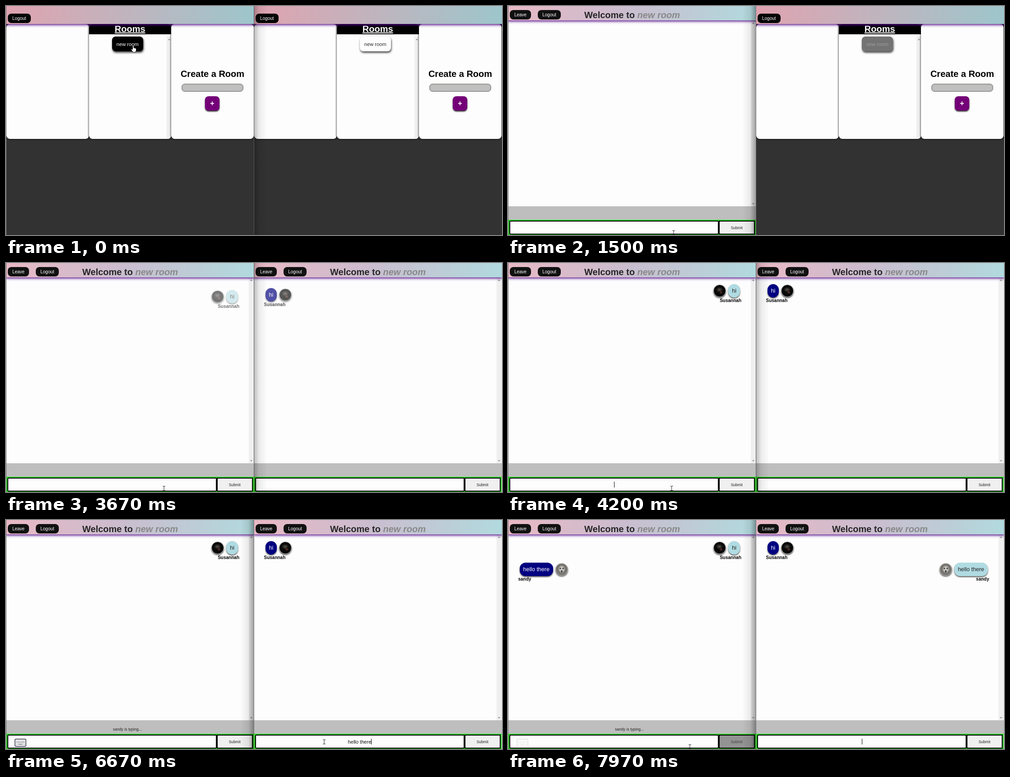
An HTML page that plays this animation: 1099 px wide and 510 px high, repeating every 8 s.

```html
<!DOCTYPE html>
<html lang="en">
<head>
<meta charset="utf-8">
<title>Chat rooms</title>
<style>
html, body { margin: 0; width: 100%; height: 100%; overflow: hidden; background: #323232; }
body { position: relative; font-family: "Liberation Sans", Arial, sans-serif; }
body * { box-sizing: border-box; }
.pane, .pane div, .shade, #cursor { position: absolute; }
.pane { top: 0; width: 550px; height: 510px; overflow: hidden; background: #323232; }
.pane::after { content: ""; position: absolute; left: 0; top: 0; width: 1px; height: 100%; background: #777; }
.page { inset: 0; isolation: isolate; }
.mid { display: flex; align-items: center; justify-content: center; white-space: pre; }
.bar { left: 0; top: 0; width: 550px; z-index: 2; box-shadow: 0 1px 6px 1px #4b0082; }
.btn { height: 21px; border-radius: 8px; background: #050505; color: #fff; font-size: 10px; }
h2 { margin: 0; font-size: 20px; line-height: 23px; }

.rooms .bar { height: 40px; background: linear-gradient(100deg, #e0a3b0, #9dc6cc); }
.card { top: 40px; width: 182.5px; height: 256px; border-radius: 8px; background: #fdfdfd; box-shadow: 0 0 4px #000; overflow: hidden; }
.title { left: 0; top: 0; width: 100%; height: 23px; background: #000; color: #fff; text-decoration: underline; }
.scroll { background: #efefef; }
.arrow { border: solid transparent; border-width: 0 2.5px 3px; border-bottom-color: #999; }
.arrow.down { transform: scaleY(-1); }
.room { left: 51px; top: 28px; width: 69.5px; height: 33px; border-radius: 8px; font-size: 11.11px; box-shadow: 1px 3px 4px #444; }
.name { left: 23px; top: 133px; width: 137px; height: 18px; border: 1.5px solid #808078; border-radius: 7px; background: #c0c0c0; box-shadow: inset 0 0 3px #888; }
.add { left: 75px; top: 161px; width: 32px; height: 32px; border-radius: 8px; background: #740078; color: #fff; font: bold 16px "Liberation Sans", Arial, sans-serif; box-shadow: 0 2px 3px #222; }

.chat { background: #bebebe; }
.chat .bar { height: 32px; background: linear-gradient(100deg, #e9b9c5, #cbbcce 45%, #b1dade); }
.chat .btn { top: 9px; background: #111; }
.chat h2 { color: #262626; }
.chat i { color: #888; }
.log { left: 1px; top: 32px; width: 549px; height: 414px; background: #fdfdfd; }
.note { left: 0; top: 460px; width: 538px; height: 12px; font-size: 8.6px; color: #222; }
.form { left: 1px; top: 476px; width: 548px; height: 34px; background: #2bdc20; }
.field { left: 1.5px; top: 2px; width: 464px; height: 31px; border: 2px solid #000; border-radius: 3px; background: #fdfdfd; font-size: 11.11px; color: #111; }
.field .caret { position: relative; width: 0; height: 13px; }
.caret::after { content: ""; position: absolute; left: 0; width: 1px; height: 13px; background: #000; }
.keys { position: absolute; left: 14.5px; top: 7px; }
.send { left: 465.5px; top: 2px; width: 80.5px; height: 31px; border: 2px solid #000; font-size: 8.4px; }

.msg { width: 200px; height: 46px; }
.msg.other { left: 24.5px; }
.msg.own { right: 36px; }
.row { inset: 0 0 auto; height: 30px; display: flex; align-items: center; gap: 5px; }
.own .row { flex-direction: row-reverse; }
.msg .row > div { position: relative; }
.bubble { padding: 0 8px; line-height: 30px; border-radius: 13px; font-size: 12.5px; white-space: pre; box-shadow: 0 2px 3px #555; }
.own .bubble { background: #b0dbe2; color: #222; }
.other .bubble { background: #000080; color: #fff; }
.face { width: 28px; height: 28px; border-radius: 50%; border: 1.5px solid #c4c4c4; box-shadow: 0 2px 3px #555; }
.dark { background: radial-gradient(ellipse 4px 3px at 62% 64%, #7c3a32, #7c3a3200), radial-gradient(ellipse 8px 6px at 48% 40%, #5a524c, #5a524c00), #080808; }
.pale {
  background: radial-gradient(ellipse 2px 3px at 50% 66%, #2c2a2a 60%, #2c2a2a00),
    radial-gradient(circle 2px at 38% 42%, #333 60%, #3330), radial-gradient(circle 2px at 62% 42%, #333 60%, #3330),
    radial-gradient(ellipse 8px 9px at 50% 48%, #cfccc8 50%, #cfccc800), #77746f;
}
.by { top: 31px; font-weight: bold; font-size: 10px; line-height: 12px; color: #050505; }
.other .by { left: -3px; }
.own .by { right: -3px; }

.shade { top: 0; width: 30px; height: 510px; }
#cursor { left: 0; top: 0; overflow: visible; }
</style>
</head>
<body>
<script>
const NAMES = ['Susannah', 'sandy'];
const WORDS = ['hi', 'hello there'];
const LOOP = 8000;

const box = (cls, x, y, w, h, html = '') =>
  `<div class="${cls}" style="left:${x}px;top:${y}px;width:${w}px;height:${h}px">${html}</div>`;

function keyboard() {
  let dots = '';
  for (let r = 0; r < 2; r++)
    for (let c = 0; c < 6; c++) dots += `M${4.2 + c * 3.2} ${5.5 + r * 3.2}h1.8`;
  return `<svg class="keys" width="26" height="18" fill="none" stroke="#5a5a68">
    <rect x="1" y="1" width="24" height="16" rx="2" stroke-width="2"/>
    <path d="${dots}M4.2 12.500h1.800M8 12.500h10M20.200 12.500h1.800" stroke-width="1.7"/></svg>`;
}

function message(i, pane) {
  return `<div class="msg ${i === pane ? 'own' : 'other'}" style="top:${46.5 - 32 + i * 48.5}px">
    <div class="row"><div class="bubble">${WORDS[i]}</div><div class="face ${i ? 'pale' : 'dark'}"></div></div>
    <div class="by">${NAMES[i]}</div></div>`;
}

function rooms() {
  return `<div class="page rooms"><div class="bar">${box('btn mid', 4, 17, 50.5, 21, 'Logout')}</div>
    <div class="card" style="left:1px"></div>
    <div class="card" style="left:183.5px">
      <h2><div class="title mid">Rooms</div></h2>
      ${box('scroll', 172.5, 28, 10, 228)}${box('arrow', 175, 33, 5, 3)}
      <div class="room mid">new room</div></div>
    <div class="card" style="left:366px">
      <h2>${box('mid', 0, 99, 183, 24, 'Create a Room')}</h2>
      <div class="name"></div><div class="add mid">+</div></div></div>`;
}

function chat(pane) {
  return `<div class="page chat"><div class="bar">
      ${box('btn mid', 4, 9, 47, 21, 'Leave')}${box('btn mid', 66, 9, 51, 21, 'Logout')}
      <h2>${box('mid', 0, 8, 550, 24, 'Welcome to <i>new room</i>')}</h2></div>
    <div class="log">${box('scroll', 537, 0, 12, 414)}
      ${box('arrow', 540, 5, 5, 3)}${box('arrow down', 540, 407, 5, 3)}
      ${message(0, pane)}${message(1, pane)}</div>
    <div class="note mid">${NAMES[1 - pane]} is typing...</div>
    <div class="form"><div class="field mid">${keyboard()}<span></span><div class="caret"></div></div>
      <div class="send mid">Submit</div></div></div>`;
}

document.body.innerHTML = [0, 1].map(p =>
  `<div class="pane" style="left:${p * 549}px">${rooms()}${chat(p)}</div>`).join('') + `
  <div class="shade" style="left:549px;background:linear-gradient(90deg,#0004,#00000012 40%,#0000)"></div>
  <div class="shade" style="left:519px;background:linear-gradient(270deg,#0005,#00000014 40%,#0000)"></div>
  <svg id="cursor" width="1" height="1">
    <path d="M-3-5Q-1.5-5-1-4.500Q0-4.500 0-4.500Q.5-5 3-5M0-4.500V4.500M-3 5Q-1 5 0 4.500Q1 5 3 5" fill="none" stroke="#222"/>
    <path d="M-2.500-7Q-1-9 0-7V-2L4-1Q5.500-.5 5.500 1V4L4 8H-1.500L-5.500 2Q-5.500 0-4 .5L-2.500 2Z" fill="#fff" stroke="#111"/>
    <path d="M-4-7V5L-1.300 2.600.5 7 2.500 6.200.7 2H4.500Z" fill="#fff" stroke="#111"/>
  </svg>`;

const panes = [...document.querySelectorAll('.pane')].map(el => {
  const one = s => el.querySelector(s);
  return {
    chat: one('.chat'), room: one('.room'), msgs: el.querySelectorAll('.msg'), note: one('.note'),
    keys: one('.keys'), text: one('.field span'), caret: one('.caret'), send: one('.send')
  };
});
const shades = document.querySelectorAll('.shade');
const cursor = document.getElementById('cursor');

const clamp = v => Math.min(1, Math.max(0, v));
const ramp = (t, from, len) => clamp((t - from) / len);
const smooth = p => p * p * (3 - 2 * p);
const within = (t, a, b) => t >= a && t < b;
const show = (el, on) => { el.style.visibility = on ? 'visible' : 'hidden'; };

// CSS "ease", cubic-bezier(.25, .1, .25, 1)
function ease(p) {
  let lo = 0, hi = 1;
  for (let i = 0; i < 16; i++) {
    const u = (lo + hi) / 2, v = 1 - u;
    if (.75 * u * v * v + .75 * u * u * v + u ** 3 < p) lo = u; else hi = u;
  }
  return .3 * lo * (1 - lo) ** 2 + 3 * lo * lo * (1 - lo) + lo ** 3;
}

const hover = (t, on, off) =>
  ease(ramp(Math.min(t, off), on, 500)) * (1 - ease(ramp(t, off, 500)));

function tint(el, p, back, ink) {
  const mix = ([a, b]) => { const v = Math.round(a + (b - a) * p); return `rgb(${v},${v},${v})`; };
  el.style.background = mix(back);
  el.style.color = mix(ink);
}

const OPEN = [350, 1770];
const TRACK = [
  [0, 283, 95], [200, 283, 95], [800, 829, 80], [1250, 829, 84], [1500, 367, 505], [1770, 367, 505],
  [2030, 350, 502], [4150, 350, 502], [4600, 705, 494], [7570, 705, 494], [7970, 403, 505], [8000, 400, 505]
];
// message start per pane, and when it first shows
const SENT = [{ start: [3420, 3350], from: 3670 }, { start: [6730, 6700], from: 6730 }];

function typed(t, pane) {
  if (pane === 0) return within(t, 2870, 3670) ? WORDS[0].slice(0, t < 3000 ? 1 : 2) : '';
  if (!within(t, 5730, 6730)) return '';
  return WORDS[1].slice(0, t < 5870 ? 1 : 2 + Math.floor((t - 5870) / 80));
}

function caretOn(t, pane) {
  const blink = from => (t - from) % 1060 < 530;
  if (pane === 1) return t >= 4900 && (t < 6730 || blink(6730));
  if (t < 1150) return t >= OPEN[0] && blink(OPEN[0]);
  if (within(t, 2870, 3670)) return true;
  if (within(t, 2040, 2870)) return blink(2040);
  return within(t, 4200, 4730);
}

function moveCursor(t) {
  const i = TRACK.findIndex(k => k[0] > t);
  const [t0, x0, y0] = TRACK[i - 1], [t1, x1, y1] = TRACK[i];
  const p = smooth((t - t0) / (t1 - t0));
  const x = x0 + (x1 - x0) * p, y = y0 + (y1 - y0) * p;
  const pane = x < 549 ? 0 : 1, px = x - pane * 549;
  const inChat = t >= OPEN[pane];
  let kind = 2;
  if (inChat && y > 478) kind = px < 466 ? 0 : 1;
  else if (!inChat && within(px, 235, 304) && within(y, 68, 101)) kind = 1;
  cursor.style.transform = `translate(${x}px,${y}px)`;
  [...cursor.children].forEach((el, n) => show(el, n === kind));
}

function render(t) {
  panes.forEach((p, n) => {
    p.chat.style.opacity = ramp(t, OPEN[n], 200);
    tint(p.room, n ? hover(t, 630, 1365) : 1, [253, 0], [40, 255]);
    tint(p.send, n ? 0 : hover(t, 4330, 4390) + hover(t, 7790, 7920), [240, 0], [30, 120]);

    p.msgs.forEach((el, i) => {
      const { start, from } = SENT[i];
      const k = ease(ramp(t, start[n], 800));
      el.style.opacity = t < from ? 0 : k;
      el.style.transform = `translateY(${28 * (1 - k)}px)`;
    });

    const busy = n ? within(t, 2900, 3670) : t >= 5730;
    const age = n ? Math.min(t, 3070) - 2900 : t - 5730;
    p.note.style.opacity = busy ? 1 : 0;
    p.keys.style.opacity = busy ? (1 - Math.cos(age * Math.PI / 1000)) / 2 : 0;

    p.text.textContent = typed(t, n);
    p.caret.style.opacity = caretOn(t, n) ? 1 : 0;
  });

  // the active window casts its shadow on the other one
  const right = ramp(t, 1150, 200) - ramp(t, 2040, 200) + ramp(t, 4900, 200);
  shades[0].style.opacity = 1 - right;
  shades[1].style.opacity = right;
  moveCursor(t);
}

const begin = performance.now();
function tick() {
  render((performance.now() - begin) % LOOP);
  requestAnimationFrame(tick);
}
tick();
</script>
</body>
</html>
```
